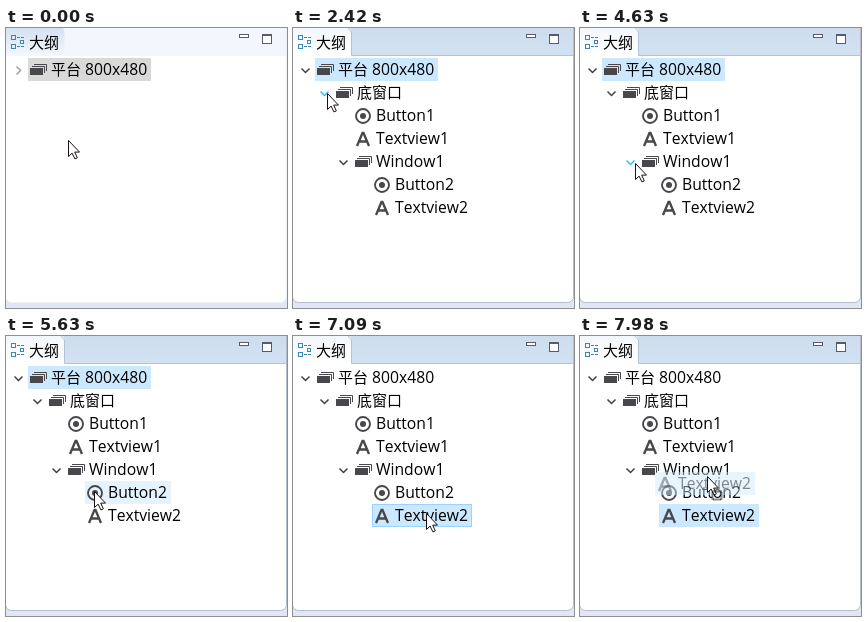
An HTML page with a canvas that plays this animation: 281 px wide and 280 px high, repeating every 8000 ms.

```html
<!DOCTYPE html>
<html lang="zh">
<head>
<meta charset="utf-8">
<title>大纲</title>
<style>
  html, body { margin: 0; width: 100%; height: 100%; overflow: hidden; background: #fff; }
  canvas { display: block; }
</style>
</head>
<body>
<canvas id="stage" width="281" height="280"></canvas>
<script>
const ctx = document.getElementById('stage').getContext('2d');
const LOOP = 8000, TICK = 64;
const ROW = 23, TOP = 30, INDENT = 19;
const LATIN = '15.7px "Open Sans", "Noto Sans", sans-serif';
const CJK = '15px "Noto Sans CJK SC", "Noto Sans CJK", sans-serif';
const DARK = '#48484c', BLUE = '#3d86b4';

// Moments when the state of the tree changes
const OPEN_ROOT = 1130, OPEN_BASE = 1860, CLOSE_WINDOW = 3190, REOPEN_WINDOW = 4630;
const SELECT = 6840, DRAG = 7340;

const item = (level, icon, label) => ({ level, icon, label });
const items = [
  item(0, 'stack', '平台 800x480'),
  item(1, 'stack', '底窗口'),
  item(2, 'radio', 'Button1'),
  item(2, 'letter', 'Textview1'),
  item(2, 'stack', 'Window1'),
  item(3, 'radio', 'Button2'),
  item(3, 'letter', 'Textview2')
];
const dragged = items.length - 1;
const grab = { x: 131, y: 172 };

// The pointer glides to each stop in even ticks
const stop = (start, end, x, y) => ({ start, end, x, y });
const stops = [
  stop(0, 0, 62, 112),
  stop(300, 750, 16, 45),
  stop(1560, 1680, 32, 61),
  stop(1860, 2060, 34, 65),
  stop(2490, 2890, 55, 135),
  stop(5420, 5630, 88, 155),
  stop(5680, 6200, 118, 180),
  stop(6330, SELECT, 133, 177),
  stop(DRAG, 7660, 226, 150),
  stop(7720, 7976, 127, 140)
];

function pointerAt(t) {
  let x = 0, y = 0;
  for (const next of stops) {
    if (t < next.start) break;
    const steps = Math.round((next.end - next.start) / TICK) + 1;
    const step = Math.floor((t - next.start) / TICK) + 1;
    const done = Math.min(1, step / steps);
    x += (next.x - x) * done;
    y += (next.y - y) * done;
  }
  return [Math.round(x), Math.round(y)];
}

function rect(x, y, w, h, color) {
  ctx.fillStyle = color;
  ctx.fillRect(x, y, w, h);
}

function outline(x, y, w, h, color) {
  ctx.strokeStyle = color;
  ctx.lineWidth = 1;
  ctx.strokeRect(x + .5, y + .5, w - 1, h - 1);
}

function trace(path, color, width = 1) {
  ctx.strokeStyle = color;
  ctx.lineWidth = width;
  ctx.stroke(new Path2D(path));
}

function at(x, y, paint) {
  ctx.save();
  ctx.translate(x, y);
  paint();
  ctx.restore();
}

// Calls visit(run, offset) for each single-script run and returns the total width
function layOut(label, visit = () => {}) {
  ctx.fontKerning = 'none';
  let offset = 0;
  for (const run of label.match(/[一-龥]+|[^一-龥]+/g)) {
    ctx.font = /[一-龥]/.test(run) ? CJK : LATIN;
    visit(run, offset);
    offset += ctx.measureText(run).width;
  }
  return offset;
}

function text(label, x, baseline) {
  ctx.fillStyle = '#000';
  layOut(label, (run, offset) => ctx.fillText(run, x + offset, baseline));
}

function verticalGradient(from, to) {
  const gradient = ctx.createLinearGradient(0, 0, 0, 28);
  gradient.addColorStop(0, from);
  gradient.addColorStop(1, to);
  return gradient;
}

function rounded(x, y, w, h, radii, fill) {
  ctx.beginPath();
  ctx.roundRect(x, y, w, h, radii);
  ctx.fillStyle = fill;
  ctx.fill();
}

function drawPanel(active) {
  rect(0, 0, 281, 280, '#e1e6f4');
  rounded(-.5, -4.5, 281, 279, [0, 0, 6, 6], '#fff');
  ctx.strokeStyle = active ? '#b5bccb' : '#eef1f8';
  ctx.lineWidth = 1;
  ctx.stroke();

  rect(0, 0, 280, 28, active ? verticalGradient('#cddded', '#d3e2f2') : '#f4f6fd');
  rounded(-2, -1, 60.5, 29, [0, 5, 0, 0],
    active ? verticalGradient('#f3f7fc', '#fff') : verticalGradient('#d3e1f2', '#f4f7fd'));
  if (active) trace('M55 0 L58.5 4 V27.5 H280', '#b5c2d4');

  for (const y of [7, 16]) {
    outline(5, y, 5, 5, BLUE);
    rect(11, y + 2, 3, 1, BLUE);
  }
  outline(14, 12, 4, 4, BLUE);
  rect(15, 9, 3, 1, BLUE);
  rect(15, 18, 3, 1, BLUE);
  text('大纲', 23, 20);

  for (const [x, height] of [[233, 4], [256, 10]]) {
    rect(x, 6, 10, height, '#fff');
    outline(x, 6, 10, height, '#555b70');
  }
  rect(256, 7, 10, 1, '#555b70');
}

// Each icon is drawn around the middle of its left edge
const icons = {
  stack() {
    rect(0, -2, 13, 7, DARK);
    trace('M2 -3.5 H14.5 V3 M4 -5.5 H16.5 V1', DARK);
  },
  radio() {
    trace('M1 0 a7 7 0 1 0 14 0 a7 7 0 1 0 -14 0', DARK, 1.9);
    rounded(5, -3, 6, 6, 3, DARK);
  },
  letter() {
    trace('M2 7 L7.5 -6 H8.5 L14 7 M4 2.5 H12', DARK, 2.3);
  }
};

function drawChevron(open, hot) {
  const path = open ? 'M-4 -2 L0 2 L4 -2' : 'M-2 -4 L2 0 L-2 4';
  trace(path, hot ? '#2bc3f0' : open ? '#404040' : '#a0a0a0', 1.5);
}

function drawContent({ level, icon, label }, y) {
  const shift = level * INDENT;
  at(24 + shift, y, icons[icon]);
  text(label, 45 + shift, y + 5);
}

const rowTop = index => TOP + index * ROW;
const rowWidth = label => Math.round(layOut(label)) + 27;

function drawItem(entry, index, { t, px, py, selected, open, dragging }) {
  const shift = entry.level * INDENT;
  const left = 22 + shift, top = rowTop(index), width = rowWidth(entry.label);
  const inRow = !dragging && py >= top && py < top + ROW;
  const hovered = inRow && px >= left && px < left + width;

  if (selected === index) {
    rect(left, top, width, ROW, t < OPEN_ROOT ? '#d9d9d9' : '#cce8ff');
    if (hovered) outline(left, top, width, ROW, '#99d1ff');
  } else if (hovered) {
    rect(left, top, width, ROW, '#e5f3ff');
  }
  if (index in open) {
    const hot = inRow && px >= left - 18 && px < left;
    at(left - 9.5, top + 12.5, () => drawChevron(open[index], hot));
  }
  drawContent(entry, top + 12);
}

function drawGhost(px, py) {
  const { level, label } = items[dragged], top = rowTop(dragged);
  at(px - grab.x, py - grab.y, () => {
    ctx.globalAlpha = .45;
    rect(22 + level * INDENT, top, rowWidth(label), ROW, '#cce8ff');
    drawContent(items[dragged], top + 12);
  });
}

function drawPointer(x, y, dragging) {
  at(x + .5, y + .5, () => {
    const arrow = 'M0 0 V16 L3.6 12.6 L6.4 18.4 L8.8 17.4 L6.2 11.6 H11 Z';
    ctx.fillStyle = '#fff';
    ctx.fill(new Path2D(arrow));
    trace(arrow, '#1a1012');
    if (dragging) {
      ctx.setLineDash([1, 1]);
      trace('M5 15 h9 v8 h-9 z', '#1a1012', 2);
    }
  });
}

function draw(t) {
  const [px, py] = pointerAt(t);
  const windowOpen = t < CLOSE_WINDOW || t >= REOPEN_WINDOW;
  const open = { 0: t >= OPEN_ROOT, 1: t >= OPEN_BASE, 4: windowOpen };
  const visible = !open[0] ? 1 : !open[1] ? 2 : windowOpen ? 7 : 5;
  const dragging = t >= DRAG;
  const state = { t, px, py, open, dragging, selected: t < SELECT ? 0 : dragged };

  drawPanel(t >= OPEN_ROOT);
  items.slice(0, visible).forEach((entry, index) => drawItem(entry, index, state));
  if (dragging) drawGhost(px, py);
  drawPointer(px, py, dragging);
}

function tick() {
  draw(performance.now() % LOOP);
  requestAnimationFrame(tick);
}
tick();
</script>
</body>
</html>
```
